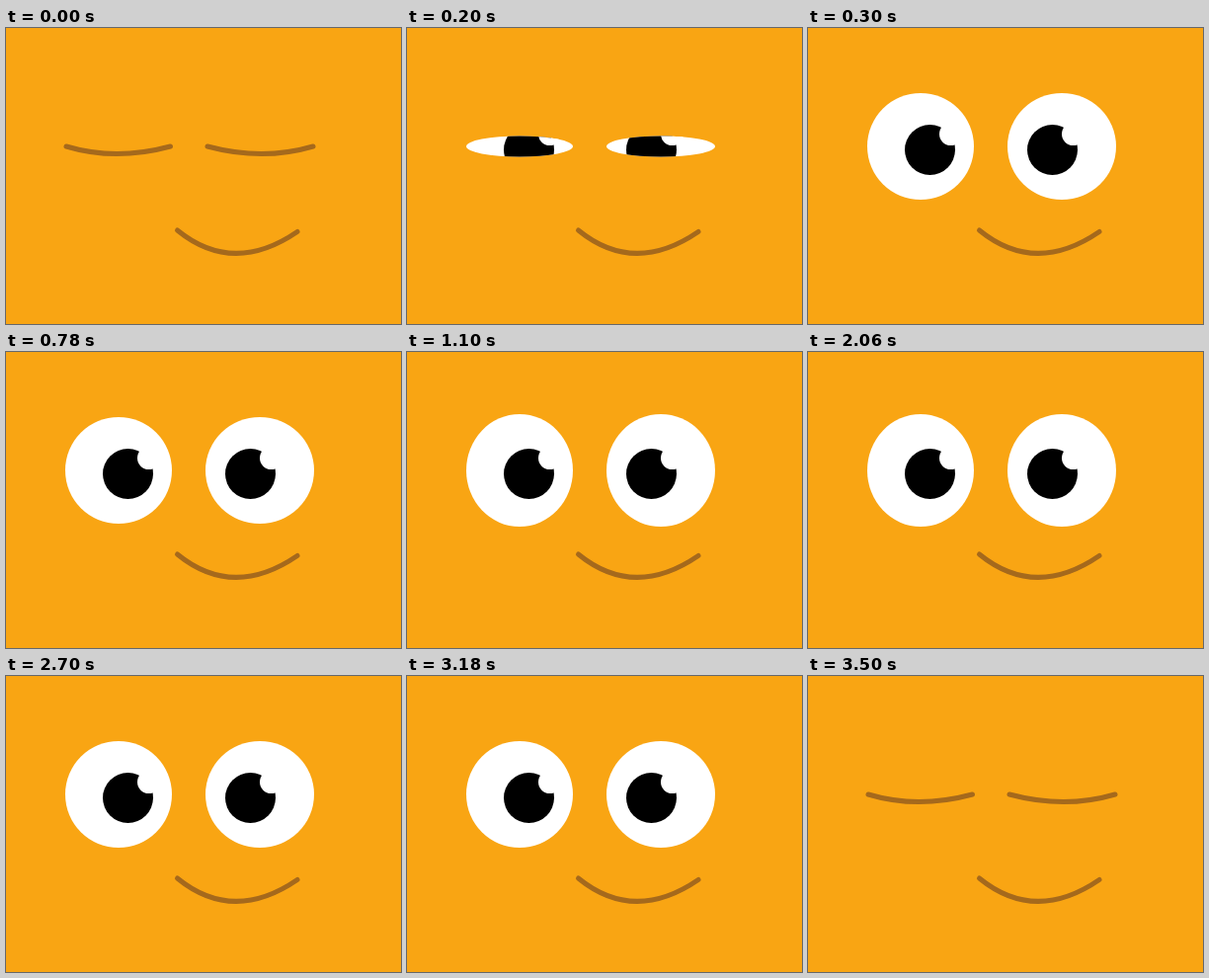
Recreate the animation shown at these times as an HTML page. Size 400 by 300 pixels, loop 3800 ms.

```html
<!DOCTYPE html>
<html lang="en">
<head>
<meta charset="utf-8">
<title>Blinking face</title>
<style>
  html, body { margin: 0; width: 100%; height: 100%; overflow: hidden; background: #f9a513; }
  .face { position: relative; width: 400px; height: 300px; overflow: hidden; }
  svg { position: absolute; left: 0; top: 0; display: block; }
  path { fill: none; stroke: #a5691c; stroke-width: 5; stroke-linecap: round; }

  .eye {
    position: absolute; top: 62px; height: 116px; background: #fff;
    animation: open 3.8s step-end infinite;
  }
  .left { left: 60px; width: 108px; }
  .right { left: 202px; width: 110px; }

  .pupil {
    position: absolute; left: var(--x); top: 35.5px; width: 51px; height: 51px;
    border-radius: 50%; background: #000;
  }
  .pupil::after {
    content: ""; position: absolute; left: 34.5px; top: -2px; width: 23px; height: 23px;
    border-radius: 50%; background: #fff;
  }
  .left .pupil { --x: 38px; }
  .right .pupil { --x: 20px; }

  .lids { animation: lids 3.8s step-end infinite; }

  @keyframes open {
    0%       { clip-path: ellipse(50% 0px); visibility: hidden; }
    5.263%   { clip-path: ellipse(50% 10.5px); visibility: visible; }
    7.8947%  { clip-path: ellipse(50% 54px); visibility: visible; }
    28.947%  { clip-path: ellipse(50% 57px); visibility: visible; }
    71.0526% { clip-path: ellipse(50% 54px); visibility: visible; }
    92.105%, 100% { clip-path: ellipse(50% 0px); visibility: hidden; }
  }
  @keyframes lids {
    0%     { visibility: visible; }
    5.263% { visibility: hidden; }
    92.105%, 100% { visibility: visible; }
  }
</style>
</head>
<body>
<div class="face">
  <div class="eye left"><div class="pupil"></div></div>
  <div class="eye right"><div class="pupil"></div></div>
  <svg width="400" height="300" viewBox="0 0 400 300">
    <g class="lids">
      <path d="M61 120Q111 135 166.500 120"/>
      <path d="M204 120Q260 135 311 120"/>
    </g>
    <path d="M173.500 205Q230 251 295 206.500"/>
  </svg>
</div>
</body>
</html>
```
